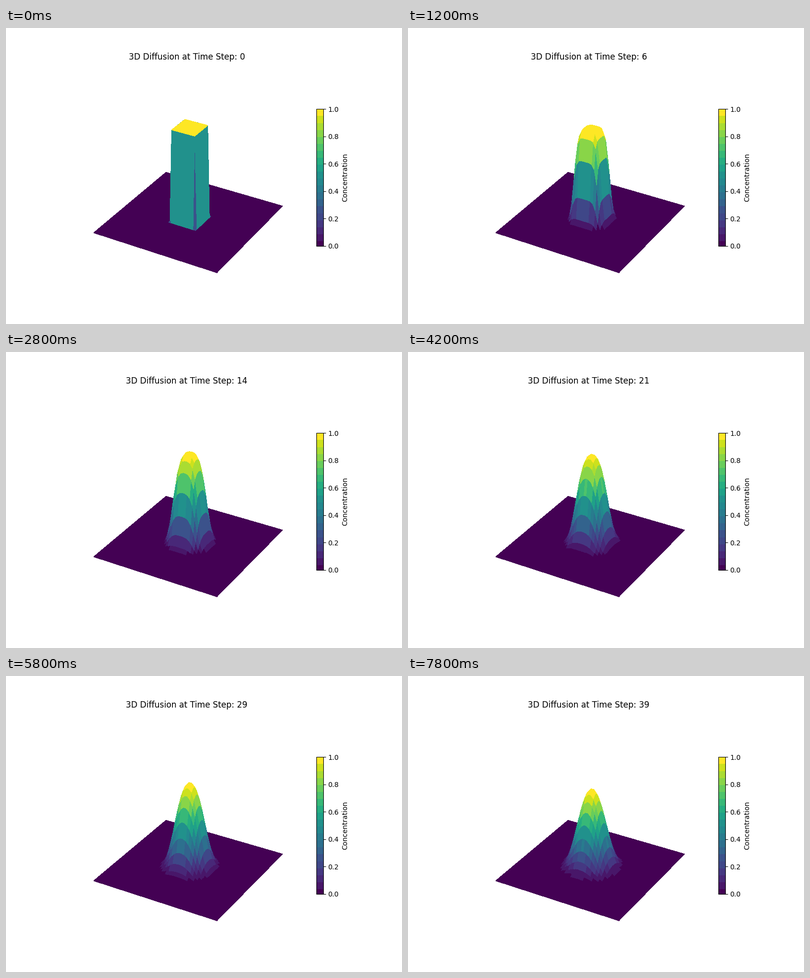
Recreate the animation shown at these times as a matplotlib script. Size 800 by 600 pixels, loop 8000 ms.

```python
import numpy as np
import matplotlib.pyplot as plt
from matplotlib.animation import FuncAnimation
from matplotlib.cm import ScalarMappable
from matplotlib.colors import ListedColormap, Normalize

N = 50
STEPS = 40
RATE = 0.1


def banded_viridis():
    """Viridis in 20 flat bands; the first is narrower than the rest."""
    i = np.arange(256)
    band = (i + 4) // 13
    centre = band * 13 + 2
    for exact in (0, 64, 128, 255):
        centre[band == band[exact]] = exact
    return ListedColormap(plt.get_cmap("viridis")(centre))


def diffuse(u):
    near = sum(np.roll(u, s, axis) for s in (-1, 1) for axis in (0, 1))
    return u + RATE * (near - 4 * u)


field = np.zeros((N, N))
field[20:30, 20:30] = 1.0
states = [field]
for _ in range(STEPS - 1):
    states.append(diffuse(states[-1]))

X, Y = np.meshgrid(np.arange(N), np.arange(N))
cmap = banded_viridis()

fig = plt.figure(figsize=(8, 6), dpi=100)
ax = fig.add_subplot(projection="3d")
ax.set_box_aspect((4, 4, 3), zoom=24 / 25)
ax.view_init(elev=30, azim=-60)
ax.set_axis_off()
ax.set(xlim=(0, N - 1), ylim=(0, N - 1), zlim=(0, 1))
title = ax.set_title("")
fig.colorbar(ScalarMappable(Normalize(0, 1), cmap), ax=ax, shrink=0.6,
             aspect=20, label="Concentration")

surface = None


def update(step):
    global surface
    if surface is not None:
        surface.remove()
    # colours rescale to the current peak on every step
    surface = ax.plot_surface(X, Y, states[step], cmap=cmap, rstride=1,
                              cstride=1, linewidth=0, antialiased=False)
    title.set_text(f"3D Diffusion at Time Step: {step}")
    return surface, title


anim = FuncAnimation(fig, update, frames=STEPS, interval=200,
                     repeat=True, repeat_delay=0, blit=False)
plt.show()
```
